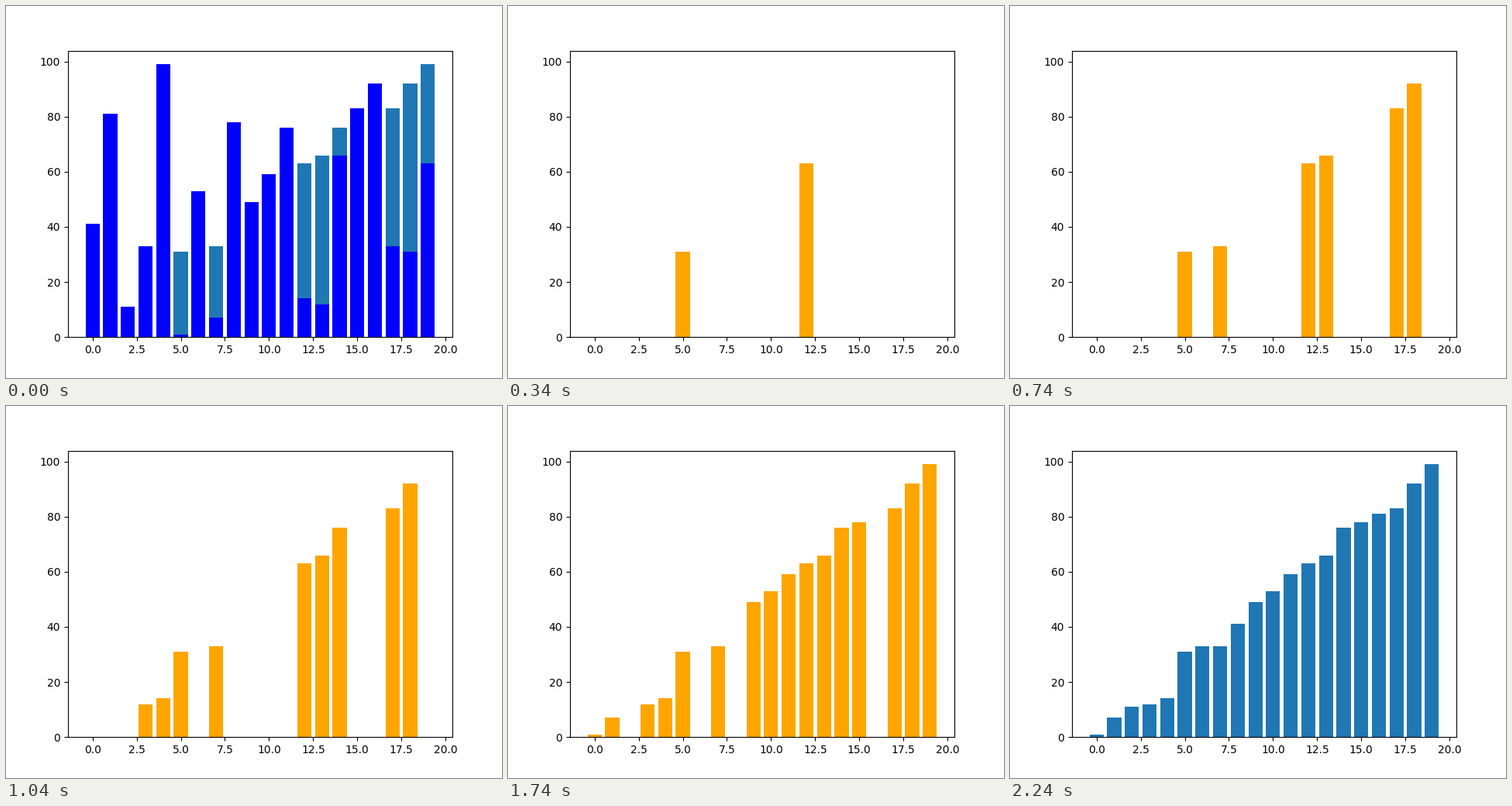
Animation, 640 px wide and 480 px high, one loop 2340 ms. Source, as a matplotlib script:

```python
import numpy as np
import matplotlib.pyplot as plt
from matplotlib.animation import FuncAnimation

TICK = 20        # ms per animation frame
LOOP = 2340      # ms per loop
STEP = 100       # ms per sorting step
PLACING = 240    # ms at which values start moving into the output

values = np.array([41, 81, 11, 33, 99, 1, 53, 7, 78, 49,
                   59, 76, 14, 12, 66, 83, 92, 33, 31, 63])
n = len(values)
order = np.argsort(values, kind="stable")
result = values[order]
slot = np.argsort(order)  # output position of each input value

fig, ax = plt.subplots(figsize=(6.4, 4.8), dpi=100)
x = np.arange(n)
sorted_bars = ax.bar(x, result)
bars = ax.bar(x, values, color="blue")


def placed(count):
    """Output of the counting sort after its last `count` inputs are placed."""
    out = np.zeros(n)
    done = slot[n - count:]
    out[done] = result[done]
    return out


def show(heights, color):
    for bar, height in zip(bars, heights):
        bar.set_height(height)
        bar.set_facecolor(color)


def show_sorted(visible):
    for bar in sorted_bars:
        bar.set_visible(visible)


def update(i):
    t = i * TICK
    count = (t - PLACING) // STEP + 1
    show_sorted(t < STEP or count > n)
    if t < 2 * STEP:
        show(values, "blue")
    elif t < PLACING:
        show(values, "green")
    elif count <= n:
        show(placed(count), "orange")
    else:
        show(np.zeros(n), "orange")
    return [*sorted_bars, *bars]


anim = FuncAnimation(fig, update, frames=LOOP // TICK, interval=TICK,
                     repeat=True, repeat_delay=0)
plt.show()
```
